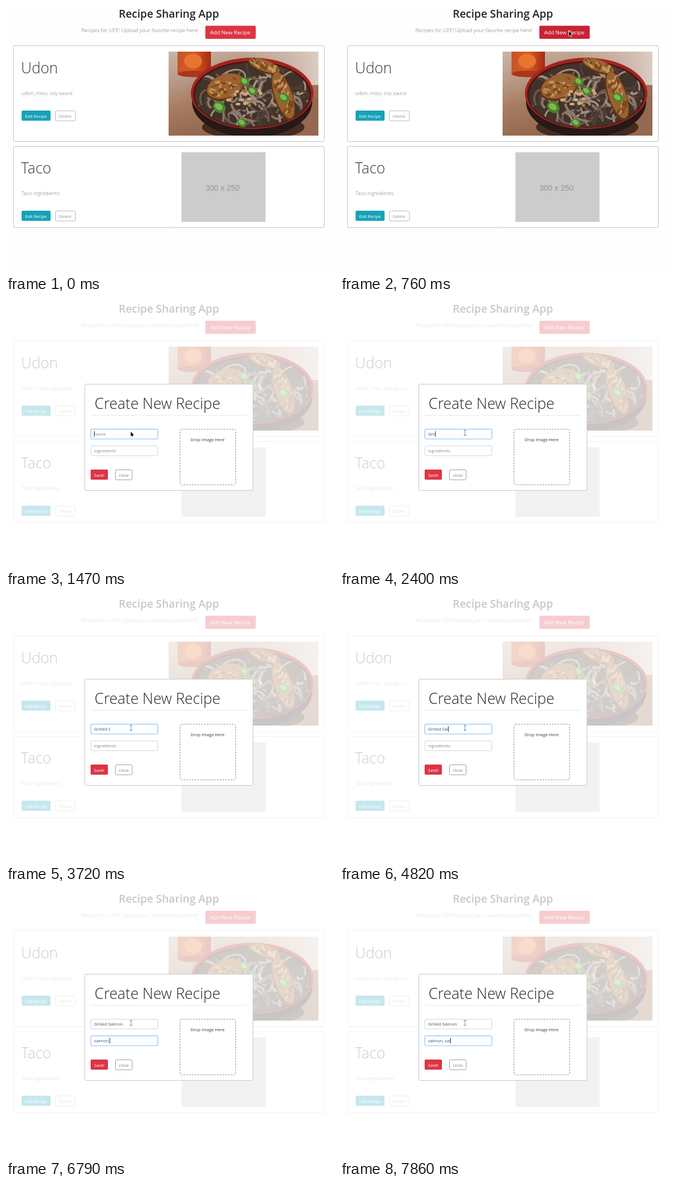
An HTML page with a canvas for the animation above (8 s loop, 589x480 px).

```html
<!DOCTYPE html>
<html lang="en">
<head>
<meta charset="utf-8">
<title>Recipe Sharing App</title>
<style>
html, body { margin: 0; width: 100%; height: 100%; overflow: hidden; background: #fefefe; }
canvas { display: block; }
</style>
</head>
<body>
<canvas id="stage" width="589" height="480"></canvas>
<script>
const LOOP = 8000;
const ENTER = 450, CLICK = 760, MODAL = 830, FOCUS = 1470, TAB = 5530;
const BLINK = 1060;

const SANS = '"Open Sans", "Noto Sans", sans-serif';
const RED = '#dc3545', RED_HOVER = '#c82333', TEAL = '#17a2b8';
const INK = '#212529', SOFT = '#6f7377', OUTLINE = '#b6b9bc';

// Bursts of typing: text, time of the first key, time of the last key
const NAME_BURSTS = [['Grilled ', 1850, 2950], ['S', 3260, 3260], ['almon', 4650, 5280]];
const FOOD_BURSTS = [['salmon,', 5920, 6790], [' ', 7170, 7170], ['sal', 7630, 7860]];

const stage = document.getElementById('stage');
let ctx = stage.getContext('2d');

const clamp = (v, lo, hi) => Math.min(hi, Math.max(lo, v));
const mix = (a, b, p) => a + (b - a) * p;

function seeded(seed) {
  return () => (seed = seed * 16807 % 2147483647) / 2147483647;
}

function text(str, x, y, size, color = INK, weight = 400, family = SANS) {
  ctx.font = `${weight} ${size}px ${family}`;
  ctx.fillStyle = color;
  ctx.fillText(str, x, y);
  return ctx.measureText(str).width;
}

function rect(x, y, w, h, fill) {
  ctx.fillStyle = fill;
  ctx.fillRect(x, y, w, h);
}

function box(x, y, w, h, fill, stroke, radius = 2) {
  const inset = stroke ? 0.5 : 0;
  ctx.beginPath();
  ctx.roundRect(x + inset, y + inset, w - 2 * inset, h - 2 * inset, radius);
  if (fill) { ctx.fillStyle = fill; ctx.fill(); }
  if (stroke) { ctx.strokeStyle = stroke; ctx.lineWidth = 1; ctx.stroke(); }
}

function oval(x, y, rx, ry, fill, turn = 0) {
  ctx.beginPath();
  ctx.ellipse(x, y, rx, ry, turn, 0, 7);
  ctx.fillStyle = fill;
  ctx.fill();
}

function fade(x0, y0, x1, y1, ...colors) {
  const g = ctx.createLinearGradient(x0, y0, x1, y1);
  colors.forEach((c, i) => g.addColorStop(i / (colors.length - 1), c));
  return g;
}

// Photo coordinates start at its own top left corner.
function drawNoodles(rnd) {
  const tones = ['#8d7768', '#6b574b', '#a38d7e', '#4d3d35'];
  ctx.save();
  ctx.beginPath();
  ctx.ellipse(150, 77, 103, 57, 0, 0, 7);
  ctx.clip();
  for (let i = 0; i < 110; i++) {
    const angle = rnd() * 7, reach = Math.sqrt(rnd()), r = 10 + rnd() * 24, from = rnd() * 7;
    ctx.beginPath();
    ctx.ellipse(150 + Math.cos(angle) * reach * 95, 82 + Math.sin(angle) * reach * 52,
      r, r * 0.65, rnd() * 3, from, from + 1.2 + rnd() * 1.6);
    ctx.strokeStyle = tones[i % tones.length];
    ctx.lineWidth = 3 + rnd() * 1.5;
    ctx.stroke();
  }
  ctx.restore();
}

function drawFried(x, y, rx, ry, turn, rnd) {
  oval(x, y + 2, rx, ry, '#5f3517', turn);
  oval(x, y, rx * 0.95, ry * 0.9, '#9a622e', turn);
  for (let i = 0; i < 30; i++) {
    const along = (rnd() * 2 - 1) * rx * 0.8, across = (rnd() * 2 - 1) * ry * 0.55;
    oval(x + along * Math.cos(turn) - across * Math.sin(turn),
      y + along * Math.sin(turn) + across * Math.cos(turn),
      2 + rnd() * 5, 1 + rnd() * 2, i % 2 ? '#c6935a' : '#7a4820', turn + rnd());
  }
}

function drawDish() {
  const rnd = seeded(77);
  rect(0, 0, 269, 151, fade(0, 0, 40, 151, '#c9b5a8', '#b99b88', '#a67a5f', '#94694f'));
  rect(130, 0, 139, 60, fade(130, 0, 269, 0, '#dccdc300', '#dccdc3'));

  // glass
  rect(16, 0, 60, 40, fade(16, 0, 76, 0, '#c4552c', '#dc5a1e', '#a52a14'));
  oval(46, 40, 30, 6, '#a8381a');
  oval(44, 17, 16, 13, '#e8752f');

  // bowl
  oval(152, 136, 92, 22, '#452b20');
  oval(150, 90, 108, 64, '#261917');
  oval(150, 75, 110, 64, '#a3231f');
  oval(150, 77, 106, 60, '#4b1713');
  oval(150, 78, 103, 58, '#41322a');
  drawNoodles(rnd);

  drawFried(102, 62, 36, 23, -0.35, rnd);
  drawFried(172, 25, 31, 11, 0.35, rnd);
  drawFried(206, 78, 46, 17, 1.25, rnd);
  for (let i = 0; i < 22; i++) {
    oval(104 + rnd() * 62, 70 + rnd() * 27, 3 + rnd() * 2, 2 + rnd(), i % 3 ? '#cfaa80' : '#a0754e');
  }
  for (const [x, y, r] of [[91, 100, 12], [137, 54, 9], [151, 71, 9], [207, 83, 10], [132, 128, 9]]) {
    oval(x, y, r, r * 0.8, '#47842a', 0.6);
    oval(x - 1, y - 1, r * 0.65, r * 0.45, '#80b850', 0.6);
  }
}

function makePhoto() {
  const canvas = document.createElement('canvas');
  canvas.width = 269;
  canvas.height = 151;
  const main = ctx;
  ctx = canvas.getContext('2d');
  drawDish();
  ctx = main;
  return canvas;
}
const photo = makePhoto();

function solidButton(label, x, y, w) {
  box(x, y, w, 18.3, label === 'Save!' ? RED : TEAL);
  text(label, x + 6.2, y + 12.5, 7.65, '#fff', 500);
}

function outlineButton(label, x, y, w, border, color) {
  box(x, y, w, 19, '#fff', border);
  text(label, x + 6.5, y + 12.5, 7.65, color);
}

function drawCard(top, bottom, base, name, food) {
  box(13, top, 559, bottom - top, '#fff', '#c2c2c2');
  text(name, 27, base, 26.6, '#3a3a3c', 300);
  text(food, 27.5, base + 39, 9.4, SOFT, 300);
  solidButton('Edit Recipe', 28, base + 67, 52);
  outlineButton('Delete', 88, base + 67, 37, OUTLINE, '#92979c');
}

function drawPage(t) {
  text('Recipe Sharing App', 202.5, 20.5, 19.4, INK, 600);
  text('Recipes for LIFE! Upload your favorite recipe here!', 135.5, 46.5, 9.43, SOFT, 300);
  box(358, 35.5, 90.5, 23.5, t > 640 && t < 910 ? RED_HOVER : RED);
  text('Add New Recipe', 366.5, 51, 9.6, '#fff', 500);
  drawCard(71, 244, 121, 'Udon', 'udon, miso, soy sauce');
  ctx.drawImage(photo, 292, 82);
  drawCard(252, 399, 301, 'Taco', 'Taco ingredients');
  rect(315, 263, 151, 125, '#ccc');
  text('300 x 250', 358, 332, 14, '#969696', 400, '"Liberation Sans", Arial, sans-serif');
}

function typing(bursts, t) {
  let value = '', lastKey = 0;
  for (const [part, from, to] of bursts) {
    const pace = (to - from) / (part.length - 1) || 1;
    const count = clamp(Math.floor((t - from) / pace) + 1, 0, part.length);
    if (!count) break;
    value += part.slice(0, count);
    lastKey = from + (count - 1) * pace;
  }
  return { value, lastKey };
}

function drawInput(y, placeholder, bursts, t, from, to) {
  const { value, lastKey } = typing(bursts, t);
  const focused = t >= from && t < to;
  if (focused) box(151, y - 1, 123, 20, '#e3f0ff', null, 3);
  box(152, y, 121, 18.5, '#fff', focused ? '#8cc4fa' : '#ced4da');
  const width = text(value || placeholder, 158, y + 11.5, 7.65, value ? '#495057' : '#80878e');
  const idle = t - Math.max(lastKey, from);
  if (focused && idle % BLINK < 455) rect(Math.round(158 + (value && width)), y + 4, 1, 10, '#333');
}

function drawModal(t) {
  rect(0, 0, 589, 480, 'rgba(255,255,255,.75)');
  box(141, 149, 303, 192, '#fff', '#c6c6c6');
  text('Create New Recipe', 159, 194, 26.8, INK, 300);
  rect(152, 205, 281, 1, '#e8e8e8');
  drawInput(230, 'Name', NAME_BURSTS, t, FOCUS, TAB);
  drawInput(260, 'ingredients', FOOD_BURSTS, t, TAB, LOOP);
  solidButton('Save!', 152, 303, 31);
  outlineButton('close', 196, 303, 31, '#9aa0a6', '#7b8289');
  ctx.setLineDash([3, 2]);
  box(312, 230, 101, 101, null, '#8f8f8f', 3);
  ctx.setLineDash([]);
  text('Drop Image Here', 331.5, 251.5, 7.65, '#33383d');
}

function drawArrow(x, y) {
  ctx.beginPath();
  for (const [dx, dy] of [[0, 0], [0, 8.5], [2, 6.8], [4, 10], [3.6, 6.2], [6, 6]]) {
    ctx.lineTo(x + dx, y + dy);
  }
  ctx.closePath();
  ctx.strokeStyle = '#fff';
  ctx.lineWidth = 1.2;
  ctx.stroke();
  ctx.fillStyle = '#111';
  ctx.fill();
}

function drawBeam(x, y, color) {
  rect(x, y - 4, 1, 9, color);
  rect(x - 2, y - 5, 5, 1, color);
  rect(x - 2, y + 4, 5, 1, color);
}

function drawPointer(t) {
  if (t < ENTER) return;
  if (t >= FOCUS + 80) return drawBeam(224, 237, t < TAB ? '#4a90d4' : '#7f8fa8');
  const arrive = clamp((t - ENTER) / (CLICK - ENTER), 0, 1);
  const leave = clamp((t - CLICK) / (FOCUS - CLICK), 0, 1);
  const x = mix(mix(470, 411, arrive), 224, leave);
  const y = mix(mix(122, 45, arrive), 235, 1 - (1 - leave) ** 1.5);
  drawArrow(Math.round(x), Math.round(y));
}

function draw(t) {
  rect(0, 0, 589, 480, '#fefefe');
  drawPage(t);
  if (t >= MODAL) drawModal(t);
  drawPointer(t);
}

const start = performance.now();
function tick() {
  draw((performance.now() - start) % LOOP);
  requestAnimationFrame(tick);
}
tick();
</script>
</body>
</html>
```
